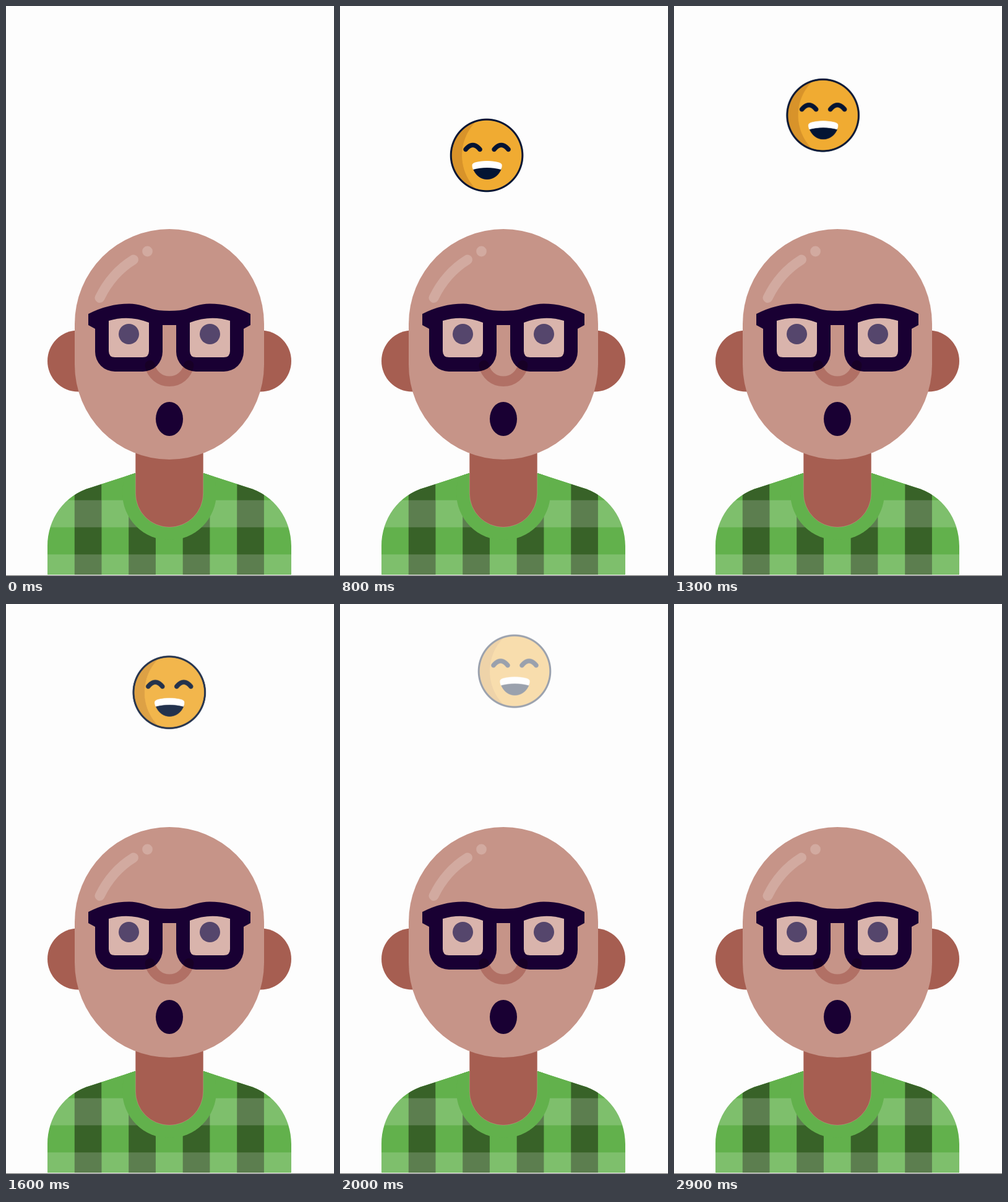
An HTML page with a canvas that plays this animation: 530x920 px, repeating every 3 s.

```html
<!DOCTYPE html>
<html lang="en">
<head>
<meta charset="utf-8">
<title>Happy thought</title>
<style>
  html, body { margin: 0; width: 100%; height: 100%; overflow: hidden; background: #fdfdfd; }
  canvas { display: block; width: 530px; height: 920px; }
</style>
</head>
<body>
<canvas id="stage" width="530" height="920"></canvas>
<script>
const ctx = document.getElementById('stage').getContext('2d');
const LOOP = 3000, STEP = 100;
const BG = '#fdfdfd', SKIN = '#c69488', DEEP = '#a65e51', INK = '#190033';
const GREEN = '#62b14c', NAVY = '#031433', YELLOW = '#f0ab32';

function fill(path, color, rule) {
  ctx.fillStyle = color;
  ctx.fill(new Path2D(path), rule || 'nonzero');
}

function line(path, color, width) {
  ctx.strokeStyle = color;
  ctx.lineWidth = width;
  ctx.lineCap = 'round';
  ctx.stroke(new Path2D(path));
}

function oval(x, y, rx, color, ry = rx) {
  ctx.fillStyle = color;
  ctx.beginPath();
  ctx.ellipse(x, y, rx, ry, 0, 0, Math.PI * 2);
  ctx.fill();
}

function rect(x, y, w, h, color) {
  ctx.fillStyle = color;
  ctx.fillRect(x, y, w, h);
}

function drawShirt() {
  ctx.save();
  ctx.clip(new Path2D('M67 918V872C67 828 94 789 138 777L209 754H319L390 777C434 789 461 828 461 872V918Z'));
  rect(60, 740, 410, 180, GREEN);
  for (const x of [110.8, 198.2, 285.7, 373.2]) rect(x, 740, 43.7, 180, '#386228');
  rect(154.5, 740, 218.7, 57.7, GREEN);
  for (const y of [797.7, 885.2]) rect(60, y, 410, 43.7, 'rgba(255,255,255,.18)');
  oval(264, 786, 76, GREEN);
  ctx.restore();
}

function drawNeck() {
  const neck = 'M209.3 715V786.5A54.7 54.7 0 0 0 318.7 786.5V715Z';
  fill(neck, DEEP);
  line('M209.3 754V786.5A54.7 54.7 0 0 0 318.7 786.5V754', 'rgba(253,235,220,.25)', 0.8);
}

function drawGlasses() {
  const holes = [
    'M166 508Q198 498 231 511V557Q231 567 221 567H176Q166 567 166 557Z',
    'M362 508Q330 498 297 511V557Q297 567 307 567H352Q362 567 362 557Z'
  ];
  for (const h of holes) fill(h, '#d9b4ac');
  const frame =
    'M133 497Q165 480.5 199 480.5C215 480.5 228 486 236 489Q245 492 264 492Q283 492 292 489' +
    'C300 486 313 480.5 329 480.5Q363 480.5 395 497V515L384 521V558A32 32 0 0 1 352 590' +
    'H307A32 32 0 0 1 275 558V515H253V558A32 32 0 0 1 221 590H176A32 32 0 0 1 144 558V521L133 515Z';
  fill(frame + holes.join(''), INK, 'evenodd');
  for (const x of [198.5, 329.5]) oval(x, 529.5, 16.5, '#55466c');
}

function drawHead() {
  for (const x of [116.5, 411.5]) oval(x, 573, 49.5, DEEP);
  drawNeck();
  fill('M111 513A153 153 0 0 1 417 513V579A153 153 0 0 1 111 579Z', SKIN);
  line('M151.5 471Q171 431 206 409.5', '#d2aaa0', 16);
  oval(228.5, 396, 8.4, '#d2aaa0');
  drawGlasses();
  ctx.globalCompositeOperation = 'multiply';
  line('M232.6 580A32 32 0 0 0 295.4 580', 'rgb(228,193,189)', 16.5);
  ctx.globalCompositeOperation = 'source-over';
  oval(264, 666.5, 22, INK, 27.5);
}

// The emoji is drawn around its own centre.
function drawEmoji(g) {
  g.save();
  g.clip(new Path2D('M-58 0A58 58 0 0 1 58 0A58 58 0 0 1 -58 0Z'));
  const disc = (x, r, color) => {
    g.fillStyle = color;
    g.beginPath();
    g.arc(x, 0, r, 0, Math.PI * 2);
    g.fill();
  };
  disc(0, 59, '#d8932a');
  disc(37, 77, YELLOW);
  g.restore();

  g.strokeStyle = NAVY;
  g.lineCap = 'round';
  g.lineWidth = 3;
  g.beginPath();
  g.arc(0, 0, 57.8, 0, Math.PI * 2);
  g.stroke();

  g.lineWidth = 7.5;
  for (const x of [-22.5, 23.5]) {
    g.beginPath();
    g.moveTo(x - 11.5, -9.5);
    g.quadraticCurveTo(x, -23.5, x + 11.5, -9.5);
    g.stroke();
  }

  g.fillStyle = NAVY;
  g.fill(new Path2D('M-22.5 21Q0 16 24 21C20 33 10 39 .5 39C-9 39 -18 33 -22.5 21Z'));
  g.fillStyle = '#fff';
  g.fill(new Path2D('M-22 23Q-24 19 -23.5 15Q-22 12 -17 11Q.5 7 18 11Q23 12 24.5 15Q25 19 23 23Q.5 17 -22 23Z'));
}

const sprite = document.createElement('canvas');
sprite.width = sprite.height = 512;
const sctx = sprite.getContext('2d');
sctx.translate(256, 256);
sctx.scale(4, 4);
drawEmoji(sctx);

function smooth(a, b, t) {
  const u = Math.min(1, Math.max(0, (t - a) / (b - a)));
  return u * u * (3 - 2 * u);
}

// Fades in above the head, sways while rising, then fades out.
function drawThought(t) {
  const alpha = smooth(400, 800, t) * (1 - smooth(1340, 2500, t));
  if (alpha <= 0) return;
  const x = 256.5 - 25.5 * Math.cos(Math.PI * (t - 1020) / 980);
  const y = 241 - 153 * Math.sin(Math.PI / 2 * (t - 800) / 1800);
  ctx.globalAlpha = alpha;
  ctx.imageSmoothingQuality = 'high';
  ctx.drawImage(sprite, x - 64, y - 64, 128, 128);
  ctx.globalAlpha = 1;
}

function draw(t) {
  rect(0, 0, 530, 920, BG);
  drawShirt();
  drawHead();
  rect(0, 919, 530, 1, '#6a6a6a');
  drawThought(t);
}

let start;
function tick(now) {
  if (start === undefined) start = now;
  const t = (now - start) % LOOP;
  draw(Math.floor(t / STEP) * STEP);
  requestAnimationFrame(tick);
}
draw(0);
requestAnimationFrame(tick);
</script>
</body>
</html>
```
